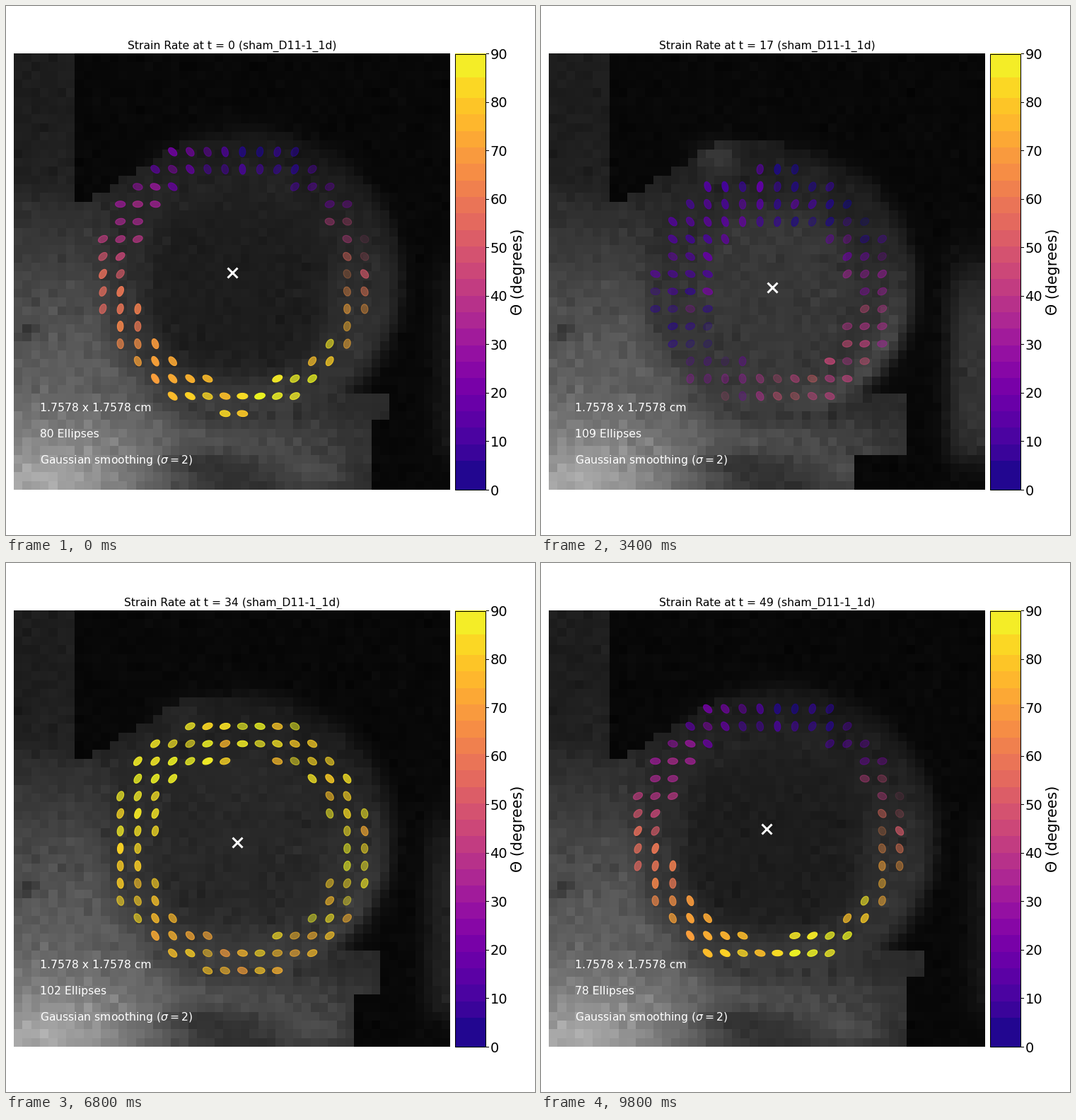
A matplotlib script for the animation above (10 s loop, 748 by 748 pixels).

```python
import numpy as np
import matplotlib.pyplot as plt
from matplotlib.animation import FuncAnimation
from matplotlib.collections import PolyCollection
from matplotlib.patches import Rectangle

plt.rcParams["font.family"] = "DejaVu Sans"

SIZE, FRAMES, STEP_MS = 748, 50, 200
LEFT, RIGHT, TOP, BOTTOM = 11, 628, 67, 684
CELLS = 50
GRID0, PITCH = np.array([137.0, 206.2]), 24.67   # ellipse lattice, in pixels

# Key points of one heartbeat.
KEYS = [0, 7, 17, 24, 30, 38, 49]
SQUEEZE = [0, .35, 1, 1, .55, .25, 0]
CENTRE_X = [320, 328, 327, 327, 328, 326, 319]
CENTRE_Y = [376.5, 378.5, 398, 402, 400, 390, 375.5]
COUNT = [80, 94, 109, 106, 107, 97, 78]

# Strain as a doubled-angle vector: +1 is radial, -1 is along the ring.
# Each is a mean plus one lobe across and one lobe down.
MEAN = [-.15 - .2j, .75 + .4j, .35 - .08j, -.3 + .25j, -.8, -.55 - .15j, -.15 - .2j]
ACROSS = [.5j, 0, -.15 - .3j, -.3 + .15j, -.1 + .15j, .3, .5j]
DOWN = [-.75, -.25 + .1j, -.3 - .3j, .35 - .25j, .1 - .4j, .1, -.75]

rng = np.random.default_rng(11)
COL, ROW = (a.ravel() for a in np.meshgrid(np.arange(17), np.arange(-1, 16)))
LATTICE = np.column_stack([COL, ROW])
SPOTS = GRID0 + PITCH * LATTICE
JITTER = rng.normal(0, .09, (COL.size, 2)) @ [1, 1j]

side = (RIGHT - LEFT) / CELLS
X, Y = np.meshgrid(LEFT + side * (np.arange(CELLS) + .5),
                   TOP + side * (np.arange(CELLS) + .5))
GRAIN = rng.normal(0, 1, X.shape)


def keyed(f, values):
    return np.interp(f, KEYS, values)


def soft(d, width):
    return 1 / (1 + np.exp(-np.clip(d / width, -40, 40)))


def blob(x, y, sx, sy):
    return np.exp(-((X - x) / sx) ** 2 - ((Y - y) / sy) ** 2)


def mix(img, value, mask):
    return img * (1 - mask) + value * mask


TISSUE = (29 + 13 * soft(Y - 275, 14) + 55 * soft(240 - X, 35) * soft(Y - 390, 55)
          + 75 * blob(50, 690, 130, 90) + 32 * blob(340, 615, 150, 30)
          + 30 * blob(430, 660, 60, 30) - 35 * blob(32, 460, 16, 14)
          - 25 * blob(265, 643, 45, 14))


def scan(f):
    """Grey tissue with a beating ring, one value per cell."""
    squeeze = keyed(f, SQUEEZE)
    roof = np.maximum(195, 285 - .6 * (X - 97))
    air = ((X > 97) & (Y < roof) | (X > 345) & (Y < 550)
           | (X > 520 - 75 * squeeze) & (Y > 585 + 50 * squeeze)
           | (X > 545 - 25 * squeeze))
    lung = 8 + (17 + 28 * squeeze) * soft(X - 608 + 30 * squeeze, 8) * soft(Y - 380, 25) * soft(640 - Y, 12)
    img = np.where(air, lung, TISSUE)

    radius = 212 - 20 * squeeze
    dx, dy = X - 345 + 8 * squeeze, Y - 385 - 8 * squeeze
    dist = np.hypot(dx, dy)
    wall = np.interp(Y, [170, 260, 400, 560], [24, 37, 52, 60]) - 6 * (X > 400)
    img = mix(img, wall, soft(radius - dist, 7))
    rim = np.exp(-((dist - radius + 22) / 18) ** 2)
    img += 26 * squeeze * rim * soft(dx - 60, 30) * soft(dy - 20, 25)
    img += 28 * squeeze * blob(250, 215, 30, 24)

    rx, ry = 128 - 18 * squeeze, 128 - 20 * squeeze
    hole = np.hypot(np.abs((X - 328) / rx) ** 1.3, np.abs((Y - 396 - 4 * squeeze) / ry) ** 1.3)
    img = mix(img, 29 + 27 * squeeze, soft((1 - hole) * 90, 9))
    flicker = np.random.default_rng(100 + f).normal(0, 1, X.shape)
    return img + (.8 + .04 * img) * GRAIN + (.4 + .012 * img) * flicker


ARC = np.linspace(0, 2 * np.pi, 28, endpoint=False)


def ellipses(f):
    """Outlines, face colours and edge colours of the visible ellipses."""
    squeeze = keyed(f, SQUEEZE)
    centre = np.array([keyed(f, CENTRE_X), keyed(f, CENTRE_Y)])
    middle = (centre - GRID0) / PITCH
    outer = np.hypot(*(LATTICE - middle - [.1, .15]).T)
    inner = np.hypot(*(LATTICE - middle - [.4, .3 + .4 * squeeze]).T)
    on = (outer < 8 - .95 * squeeze) & (inner > 5.95 - 1.85 * squeeze)

    spots = SPOTS[on]
    bearing = np.arctan2(*(spots - centre).T[::-1])
    strain = (keyed(f, MEAN) + keyed(f, ACROSS) * np.cos(bearing)
              + keyed(f, DOWN) * np.sin(bearing) + JITTER[on])
    tilt = np.angle(strain) / 2
    alpha = np.clip(np.abs(strain), .05, 1)

    turn = (bearing + tilt)[:, None]
    u = (6 + 1.5 * alpha)[:, None] * np.cos(ARC)
    v = (5.3 - 1.2 * alpha)[:, None] * np.sin(ARC)
    xs = spots[:, :1] + u * np.cos(turn) - v * np.sin(turn)
    ys = spots[:, 1:] + u * np.sin(turn) + v * np.cos(turn)

    face = plt.cm.plasma(np.abs(tilt) / (np.pi / 2))
    edge = face.copy()
    face[:, 3] = alpha
    edge[:, 3] = np.minimum(1, alpha * 1.1)
    return np.stack([xs, ys], axis=2), face, edge


fig = plt.figure(figsize=(8, 8), dpi=SIZE / 8, facecolor="white")
ax = fig.add_axes([0, 0, 1, 1])

picture = ax.imshow(scan(0), cmap="gray", vmin=0, vmax=255, interpolation="nearest",
                    extent=(LEFT, RIGHT, BOTTOM, TOP), aspect="auto")
shapes = ax.add_collection(PolyCollection([], linewidths=.9))
cross, = ax.plot([], [], "x", color="white", markersize=11.5, markeredgewidth=2.3)

title = ax.text((LEFT + RIGHT) / 2, 61, "", fontsize=12, ha="center")
ax.text(48, 573, "1.7578 x 1.7578 cm", fontsize=12, color="white")
tally = ax.text(48, 610, "", fontsize=12, color="white")
ax.text(48, 647, r"Gaussian smoothing ($\sigma = 2$)", fontsize=12, color="white")


def bar_y(deg):
    return BOTTOM - (BOTTOM - TOP) * deg / 90


bands = np.r_[0, np.arange(6, 82, 3.4), 85, 90]
for lo, hi in zip(bands[:-1], bands[1:]):
    ax.add_patch(Rectangle((635, bar_y(hi)), 44, bar_y(lo) - bar_y(hi), linewidth=0,
                           antialiased=False, color=plt.cm.plasma((lo + hi) / 180)))
ax.add_patch(Rectangle((635.5, TOP + .5), 43, BOTTOM - TOP - 1, fill=False, linewidth=.8))
for deg in range(0, 91, 10):
    ax.plot([679, 682.5], [bar_y(deg)] * 2, color="black", linewidth=.8)
    ax.text(684.5, bar_y(deg) + 7.5, str(deg), fontsize=15)
ax.text(724, 375.5, "Θ (degrees)", fontsize=16, rotation=90, ha="center", va="center")

ax.set_xlim(0, SIZE)
ax.set_ylim(SIZE, 0)
ax.axis("off")


def draw(f):
    picture.set_data(scan(f))
    verts, face, edge = ellipses(f)
    shapes.set_verts(verts)
    shapes.set_facecolor(face)
    shapes.set_edgecolor(edge)
    cross.set_data([keyed(f, CENTRE_X)], [keyed(f, CENTRE_Y)])
    title.set_text(f"Strain Rate at t = {f} (sham_D11-1_1d)")
    tally.set_text(f"{round(keyed(f, COUNT))} Ellipses")
    return picture, shapes, cross, title, tally


anim = FuncAnimation(fig, draw, frames=FRAMES, interval=STEP_MS, repeat=True, repeat_delay=0)
plt.show()
```
